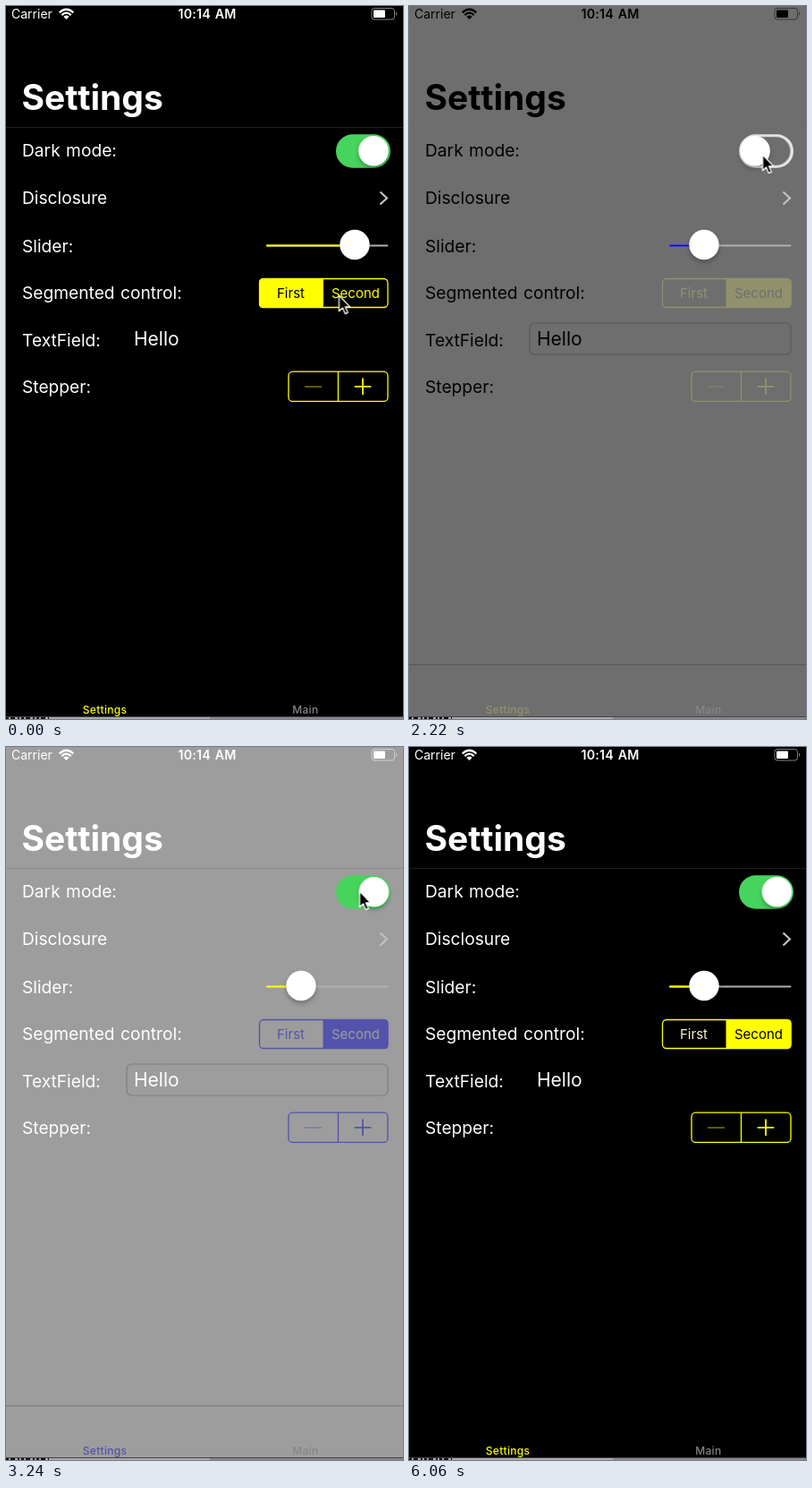
Write an HTML page that moves like this. It is 444 px wide and 796 px high and loops after 6.12 s.

```html
<!DOCTYPE html>
<html lang="en">
<head>
<meta charset="utf-8">
<title>Settings theme switch</title>
<style>
@property --bg { syntax: "<color>"; inherits: true; initial-value: #000; }
@property --tint { syntax: "<color>"; inherits: true; initial-value: #ff0; }
@property --rule { syntax: "<color>"; inherits: true; initial-value: #1c1c1c; }
@property --ink { syntax: "<color>"; inherits: true; initial-value: #fff; }
@property --bar { syntax: "<color>"; inherits: true; initial-value: #ff0; }

html, body { margin: 0; width: 100%; height: 100%; overflow: hidden; background: #000; }
svg {
  display: block; width: 444px; height: 796px;
  font: 19.2px Inter, "Open Sans", sans-serif; word-spacing: 1px;
  animation: 6120ms ease-in-out infinite;
  animation-name: theme, tint, ink;
  animation-timing-function: ease-in-out, ease-in-out, step-end;
}
.bg { fill: var(--bg); }
.ink { fill: var(--ink); }
.tint { fill: var(--tint); }
.line { fill: none; stroke: var(--tint); stroke-width: 1.3; }
.title { font-size: 39px; font-weight: 700; }
.status { font-size: 14px; }
.clock { font-size: 14.2px; font-weight: 600; letter-spacing: .2px; text-anchor: middle; }
.seg { font-size: 15px; text-anchor: middle; }
.tabs { font-size: 12px; font-weight: 500; letter-spacing: .3px; text-anchor: middle; }
.off { fill: #858585; }
.knob { fill: #fff; filter: drop-shadow(0 3px 2.5px rgba(0, 0, 0, .28)); }

.settings, .main, .first, .second, .late { animation: 6120ms step-end infinite; }
.settings { animation-name: settings; }
.main { animation-name: main; }
.first { animation-name: first; }
.second { animation-name: second; }
.late { animation-name: late; }

.ring, .hole, .switch, .filled, .thumb, .cursor { animation: 6120ms ease-in-out infinite; }
.ring { animation-name: ring; }
.hole { animation-name: hole; transform-origin: 399.5px 162px; }
.switch { animation-name: switch; }
.filled { fill: var(--bar); animation-name: filled; }
.thumb { animation-name: thumb; }
.cursor { animation-name: cursor; }

@keyframes theme {
  0%, 32.84% { --bg: #000; --rule: rgba(255, 255, 255, .12); }
  40.36%, 49.43% { --bg: #fff; --rule: rgba(0, 0, 0, .25); }
  57.6%, 100% { --bg: #000; --rule: rgba(255, 255, 255, .12); }
}
@keyframes tint {
  0%, 32.84% { --tint: #ff0; }
  40.36%, 49.9% { --tint: #00f; }
  57.6%, 100% { --tint: #ff0; }
}
@keyframes ink {
  0% { --ink: #fff; --bar: #ff0; }
  32.84% { --ink: #000; --bar: #00f; }
  49.43%, 100% { --ink: #fff; --bar: #ff0; }
}
@keyframes settings {
  0% { visibility: visible; }
  67.65% { visibility: hidden; }
  84.31%, 100% { visibility: visible; }
}
@keyframes main {
  0% { visibility: hidden; }
  67.65% { visibility: visible; }
  84.31%, 100% { visibility: hidden; }
}
@keyframes first {
  0% { opacity: 1; }
  3.92%, 100% { opacity: 0; }
}
@keyframes second {
  0% { opacity: 0; }
  3.92%, 100% { opacity: 1; }
}
@keyframes late {
  0% { fill: var(--tint); }
  84.31%, 100% { fill: #f6f6c8; }
}
@keyframes ring {
  0%, 32.19% { fill: #47d45d; }
  35.29%, 49.02% { fill: #e5e5e5; }
  52%, 100% { fill: #47d45d; }
}
@keyframes hole {
  0%, 32.6% { transform: scale(0); }
  37%, 49.02% { transform: scale(1); }
  52.6%, 100% { transform: scale(0); }
}
@keyframes switch {
  0%, 32.19% { transform: translateX(411px); }
  36.44%, 49.02% { transform: translateX(387px); }
  52.6%, 100% { transform: translateX(411.5px); }
}
@keyframes filled {
  0%, 13.73% { width: 99px; }
  23.53%, 100% { width: 39px; }
}
@keyframes thumb {
  0%, 13.73% { transform: translateX(390px); }
  23.53%, 100% { transform: translateX(330px); }
}
@keyframes cursor {
  0%, 6.86% { transform: translate(372.5px, 323px); }
  11.76%, 13.73% { transform: translate(390px, 267px); }
  23.53%, 25% { transform: translate(330px, 267px); }
  30.39%, 44.12% { transform: translate(395.5px, 166px); }
  47.06%, 53.1% { transform: translate(395.5px, 161px); animation-timing-function: linear; }
  55.88% { transform: translate(322.5px, 602.5px); animation-timing-function: ease-out; }
  59.8%, 74.02% { transform: translate(309.5px, 782.5px); animation-timing-function: ease-in; }
  77.45% { transform: translate(180px, 757px); animation-timing-function: ease-out; }
  80.88%, 88.23% { transform: translate(50px, 772px); visibility: visible; }
  88.24%, 100% { transform: translate(50px, 772px); visibility: hidden; }
}
</style>
</head>
<body>
<svg viewBox="0 0 444 796">
  <rect class="bg" width="444" height="796"/>

  <!-- Status bar -->
  <g class="ink status">
    <text x="6" y="14">Carrier</text>
    <text class="clock" x="225" y="14">10:14 AM</text>
    <g fill="none" style="stroke: var(--ink)" stroke-width="2.3">
      <path d="M59.7 7.3Q67.5 .2 75.3 7.3M62.3 10.1Q67.5 5.2 72.7 10.1"/>
    </g>
    <path d="M64.4 11.9Q67.5 9 70.6 11.9L67.5 15Z"/>
    <rect x="409" y="2.5" width="25.5" height="12.5" rx="3" fill="none" style="stroke: var(--ink)" stroke-opacity=".5"/>
    <rect x="411" y="4.5" width="13" height="8.5" rx="1"/>
    <path d="M436 6.5Q438.5 8.7 436 11Z" opacity=".5"/>
  </g>
  <rect y="135" width="444" height="1" style="fill: var(--rule)"/>
  <rect y="735" width="444" height="1" fill-opacity=".22"/>

  <g class="settings">
    <g class="ink">
      <text class="title" x="17.5" y="116">Settings</text>
      <text x="18" y="168">Dark mode:</text>
      <text x="18" y="220.5">Disclosure</text>
      <text x="18" y="274.5">Slider:</text>
      <text x="18" y="327">Segmented control:</text>
      <text x="18" y="379.5">TextField:</text>
      <text x="143" y="378.7" font-size="21">Hello</text>
      <text x="18" y="432">Stepper:</text>
    </g>

    <!-- Switch -->
    <rect class="ring" x="369" y="143.3" width="61" height="37.4" rx="18.7"/>
    <rect class="bg hole" x="371" y="145.3" width="57" height="33.4" rx="16.7"/>
    <circle class="knob switch" cy="161.8" r="16.8"/>

    <path d="M418.5 207.5L426 214.5L418.5 221.5" fill="none" stroke="#c2c2c5" stroke-width="2.2"/>

    <!-- Slider -->
    <rect x="291" y="266.6" width="136.5" height="1.8" rx=".9" fill="#b0b0b0"/>
    <rect class="filled" x="291" y="266.6" height="1.8" rx=".9"/>
    <circle class="knob thumb" cy="266.5" r="16.7"/>

    <!-- Segmented control -->
    <g class="seg">
      <g class="first">
        <path class="tint" d="M355 304H287.5Q283 304 283 308.5V332.5Q283 337 287.5 337H355Z"/>
        <text class="bg" x="318.5" y="326">First</text>
        <text class="tint" x="391" y="326">Second</text>
      </g>
      <g class="second">
        <path class="tint" d="M354.5 304H423Q427.5 304 427.5 308.5V332.5Q427.5 337 423 337H354.5Z"/>
        <text class="late" x="318.5" y="326">First</text>
        <text class="bg" x="391" y="326">Second</text>
      </g>
    </g>
    <rect class="line" x="283.5" y="304.5" width="143.5" height="32" rx="4.5"/>

    <rect x="135" y="354" width="292" height="35" rx="5.5" fill="none" stroke="#000" stroke-opacity=".2" stroke-width="1.2"/>

    <!-- Stepper -->
    <rect class="line" x="316" y="408.2" width="111" height="33.2" rx="4.5"/>
    <path class="line" d="M371.5 408V441.5"/>
    <path class="line" d="M334 425H353" opacity=".55"/>
    <path class="line" d="M389.7 424.8H408.3M399 415.5V434.1" style="stroke-width: 1.8"/>

    <g class="tabs">
      <text class="tint" x="110.5" y="789.5">Settings</text>
      <text class="off" x="334.8" y="789.5">Main</text>
    </g>
  </g>

  <g class="main">
    <g class="ink">
      <text class="title" x="17.5" y="116">Main</text>
      <text x="18" y="168">red</text>
      <text x="18" y="221">blue</text>
      <text x="18" y="274">green</text>
    </g>
    <g class="tabs">
      <text class="off" x="110.5" y="789.5">Settings</text>
      <text class="tint" x="334.8" y="789.5">Main</text>
    </g>
  </g>

  <!-- Window edge -->
  <rect y="793" width="444" height="1" fill="#444"/>
  <rect y="794" width="444" height="2" fill="#888"/>
  <rect y="794" width="228" height="2" fill="#aaa"/>
  <path d="M0 795H48" stroke="#111" stroke-width="2" stroke-dasharray="3 2 5 3 2 2"/>

  <path class="cursor" d="M0 0V17.8L4 14L6.8 20.6L9.8 19.3L7 12.9H12.2Z" stroke="#fff" stroke-width="1.3" stroke-linejoin="round"/>
</svg>
</body>
</html>
```
